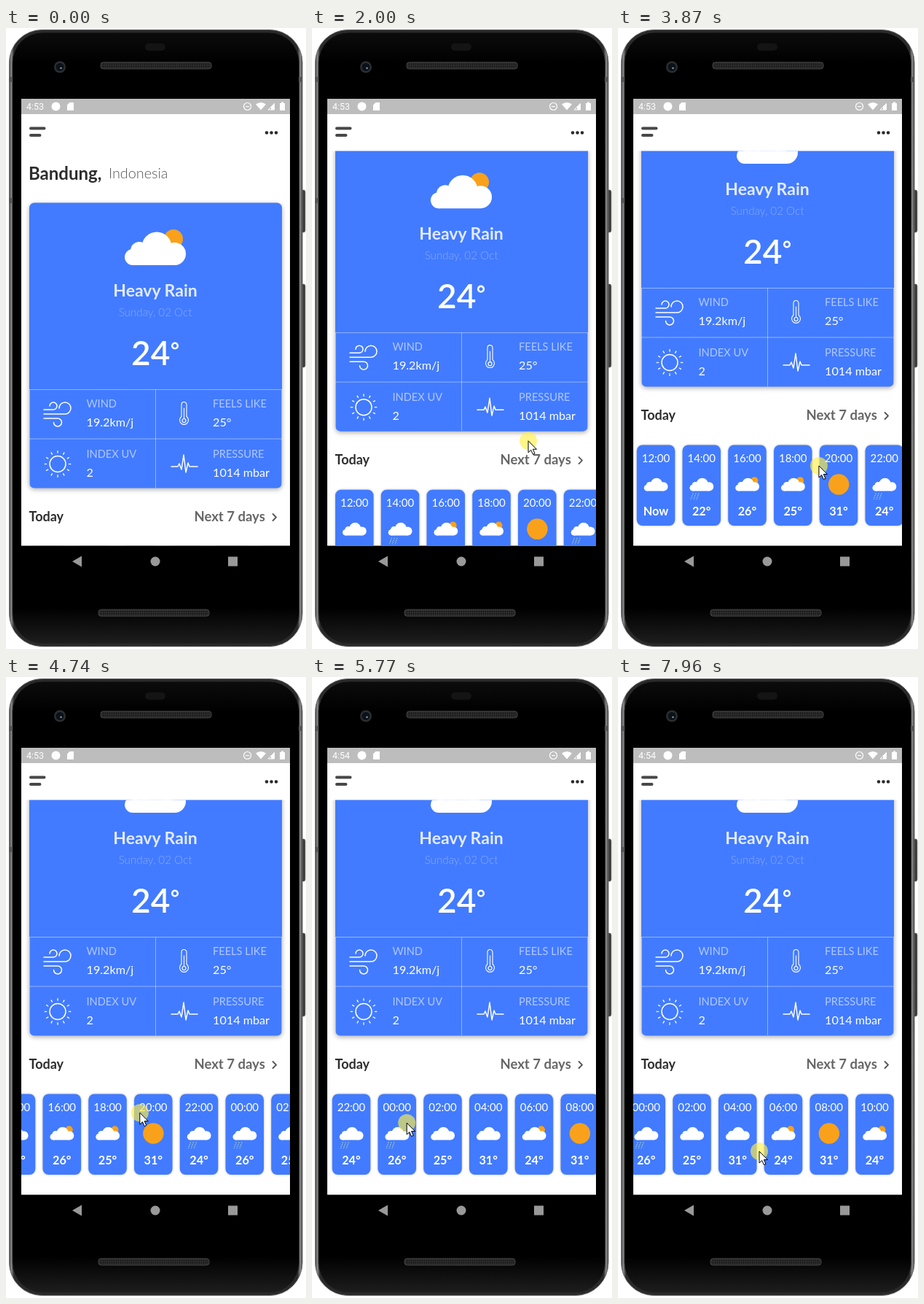
Animation of 412 by 851 pixels, one loop 7.99 s. Source, as an HTML page:

```html
<!DOCTYPE html>
<html lang="en">
<head>
<meta charset="utf-8">
<title>Weather app</title>
<style>
  html, body { margin: 0; width: 100%; height: 100%; overflow: hidden; background: #fff; }
  svg { display: block; width: 100%; height: 100%; }
  text { font-family: Lato, sans-serif; font-size: 16.2px; fill: #fff; }
  .bold { font-weight: 700; }
  .light { font-weight: 300; }
  .label { font-size: 14.6px; fill: #b0c7ff; }
  .mid { text-anchor: middle; }
  .line { fill: none; stroke: #fff; stroke-width: 1.5; stroke-linecap: round; stroke-linejoin: round; }
  .card { fill: #427bff; filter: drop-shadow(0 2px 3px rgba(0, 0, 0, .32)); }
  .hour { fill: #427bff; filter: drop-shadow(0 0 1.5px rgba(0, 0, 0, .3)); }
  .sun { fill: #f9a11b; }
</style>
</head>
<body>
<svg viewBox="0 0 412 851">
  <defs>
    <linearGradient id="rim">
      <stop offset="0" stop-color="#3a3a3a"/><stop offset=".007" stop-color="#8c8c8c"/>
      <stop offset=".016" stop-color="#2a2a2a"/><stop offset=".984" stop-color="#2a2a2a"/>
      <stop offset=".993" stop-color="#8c8c8c"/><stop offset="1" stop-color="#3a3a3a"/>
    </linearGradient>
    <linearGradient id="glass" x2="0" y2="1">
      <stop offset="0" stop-color="#0c0c0c"/><stop offset=".05"/><stop offset=".94"/>
      <stop offset="1" stop-color="#1e1e1e"/>
    </linearGradient>
    <pattern id="grille" width="3" height="3" patternUnits="userSpaceOnUse">
      <rect width="3" height="3" fill="#2e2e2e"/><circle cx="1.5" cy="1.5" r=".9" fill="#111"/>
    </pattern>
    <clipPath id="page"><path d="M21 168.5H390V709.5H21z"/></clipPath>
    <g id="cloud" fill="#fff">
      <circle cx="11" cy="35" r="11"/><circle cx="20" cy="26" r="12"/>
      <circle cx="44" cy="21" r="20.5"/><circle cx="68.5" cy="30.5" r="15.5"/>
      <path d="M11 26H68V46H11z"/>
    </g>
    <g id="sunCloud"><circle class="sun" cx="67" cy="10" r="13"/><use href="#cloud"/></g>
    <g id="rainCloud">
      <use href="#cloud"/>
      <path d="M12 54l-8 22M22 54l-8 22M32 54l-8 22" fill="none" stroke="#a9cfc4" stroke-width="3" stroke-dasharray="4 3"/>
    </g>
    <circle id="sun" class="sun" cx="42" cy="23" r="36.5"/>
  </defs>

  <g id="phone">
    <path d="M404 222h5q2 0 2 3v52q0 3-2 3h-5zM404 351h5q2 0 2 3v108q0 3-2 3h-5z" fill="#3a3a3a" stroke="#777" stroke-width=".6"/>
    <rect x="4.5" y="2.5" width="402.5" height="845" rx="45" fill="url(#rim)" stroke="#666"/>
    <rect x="9" y="6" width="393.5" height="838" rx="41" fill="url(#glass)" stroke="#2b2b2b"/>
    <path d="M4 67h5v7H4zM402 67h5v7h-5zM4 233h5v7H4z" fill="#555"/>
    <rect x="191" y="21" width="28" height="10" rx="5" fill="#141414"/>
    <circle cx="74" cy="53.5" r="8" fill="#2b2e31"/>
    <circle cx="74" cy="53.5" r="5.5" fill="#0c1218"/>
    <circle cx="75.5" cy="55" r="1.3" fill="#8195a5"/>
    <rect x="130" y="47" width="152" height="9" rx="3.5" fill="url(#grille)" stroke="#484848"/>
    <rect x="127" y="797" width="152" height="9" rx="3.5" fill="url(#grille)" stroke="#484848"/>
    <path d="M91 731l13-7.5v15zM305 724.500h13v13h-13z" fill="#999"/>
    <circle cx="205" cy="731" r="6.5" fill="#999"/>
  </g>

  <path d="M21 97H390V709.5H21z" fill="#fff"/>
  <g clip-path="url(#page)"><g id="content"></g></g>
  <path d="M21 97H390V118H21z" fill="#bdbdbd"/>
  <text id="clock" x="28" y="112" style="font: 12.5px Roboto, sans-serif"></text>
  <g fill="#fff">
    <circle cx="68.5" cy="107.5" r="6"/>
    <path d="M87.5 102h5.5v11h-9v-7.5zM343 104.5q7-5 14 0l-7 8zM376 103h2v-1.500h3V103h2v10h-7z"/>
    <path d="M360 112l8.5-8.5v8.5z" fill="none" stroke="#fff"/>
    <path d="M364 112v-4l4.5-4.5v8.5zM329 107h5v1.2h-5z"/>
    <circle cx="331.5" cy="107.5" r="5" fill="none" stroke="#fff" stroke-width="1.2"/>
  </g>
  <path d="M34 137.500H52.500M34 147H46.500" stroke="#484848" stroke-width="4" stroke-linecap="round"/>
  <path d="M358 143.500h14" stroke="#2b2b2b" stroke-width="4.600" stroke-linecap="round" stroke-dasharray="0 6.500"/>

  <g id="cursor">
    <circle r="12" fill="#fff04a" fill-opacity=".65"/>
    <path d="M0 0v16l3.700-3.500 2.700 6 2.600-1.200-2.600-5.800h5z" fill="#fff" stroke="#000"/>
  </g>
</svg>

<script>
const LOOP = 7990;
const $ = id => document.getElementById(id);
const text = (x, y, string, cls = '', style = '') =>
  `<text x="${x}" y="${y}" class="${cls}" style="${style}">${string}</text>`;
const stat = (x, y, label, value) => text(x, y, label, 'label') + text(x, y + 26, value);

const temps = 'Now 22° 26° 25° 31° 24° 26° 25° 31° 24° 31° 24°'.split(' ');
const icons = ('cloud rainCloud sunCloud sunCloud sun rainCloud ' +
  'rainCloud cloud cloud sunCloud sun sunCloud').split(' ');

const hourCard = (temp, i) => `
  <g transform="translate(${32 + i * 62.75} 710.5)">
    <rect class="hour" width="52.5" height="110.5" rx="8"/>
    ${text(26.25, 23, String((12 + 2 * i) % 24).padStart(2, '0') + ':00', 'mid', 'font-size:15px')}
    <use href="#${icons[i]}" transform="translate(10 45) scale(.39)"/>
    ${text(26.25, 96.5, temp, 'mid bold')}
  </g>`;

$('content').innerHTML = `
  ${text(31, 208, 'Bandung,', 'bold', 'font-size:24px;fill:#2d2d2d')}
  ${text(141, 206, 'Indonesia', 'light', 'font-size:19.8px;fill:#555')}
  <rect class="card" x="32" y="239.5" width="347" height="391" rx="7"/>
  <use href="#sunCloud" x="163" y="279"/>
  ${text(205, 367.5, 'Heavy Rain', 'mid bold', 'font-size:23px;fill:#e3ebff')}
  ${text(205, 395, 'Sunday, 02 Oct', 'mid light', 'font-size:15.2px;fill:#86a9ff')}
  ${text(172, 462, '24', '', 'font-size:46px;font-weight:600')}
  <circle class="line" cx="232" cy="435.5" r="3.8" style="stroke-width:2.6"/>
  <path d="M32 495.5H379M32 563H379M205.5 495.5V630M32.5 495.5V626M378.5 495.5V626" stroke="#fff" stroke-opacity=".42" fill="none"/>
  ${stat(110.5, 520, 'WIND', '19.2km/j')}
  ${stat(284, 520, 'FEELS LIKE', '25°')}
  ${stat(110.5, 588.5, 'INDEX UV', '2')}
  ${stat(284, 588.5, 'PRESSURE', '1014 mbar')}
  <g class="line">
    <path d="M52 523h13a5 5 0 1 0-5-5M52 529h29a8 8 0 1 0-8-8M52 535h19a5.500 5.500 0 1 1-5.500 5.500"/>
    <path d="M241 532.500V516a3.500 3.500 0 0 1 7 0v16.500a6 6 0 1 1-7 0zM244.500 521v14" stroke-width="1.100"/>
    <circle cx="244.5" cy="538" r="2.5" stroke-width="1.2"/>
    <circle cx="71" cy="597.5" r="11"/>
    <circle cx="71" cy="597.5" r="16.5" pathLength="120" stroke-width="3.5" stroke-linecap="butt" stroke-dasharray="1.6 8.4" stroke-dashoffset=".8"/>
    <path d="M227 601h9l2-4 3 8 3-20 3 24 3-13 2 5h11"/>
  </g>
  ${text(31.5, 676, 'Today', 'bold', 'font-size:18px;fill:#2d2d2d')}
  ${text(258.5, 676, 'Next 7 days', 'bold', 'font-size:18.5px;fill:#666')}
  <path class="line" d="M366.500 666l4.500 4.500-4.500 4.500" style="stroke:#555;stroke-width:1.8"/>
  <g id="hours">${temps.map(hourCard).join('')}</g>`;

// Progress from 0 to 1 between two times.
const ramp = (time, from, to) => Math.min(1, Math.max(0, (time - from) / (to - from)));
const easeOut = p => 1 - (1 - p) ** 2;
const easeInOut = p => p * p * (3 - 2 * p);

const scrollY = time => 51 * ramp(time, 770, 1550) + 88 * ramp(time, 1570, 2350) ** 2;

const scrollX = time =>
  11 * ramp(time, 3780, 3940) +
  115 * ramp(time, 4090, 4870) +
  192 * easeOut(ramp(time, 4950, 5770)) +
  78 * easeInOut(ramp(time, 5770, 7700));

// Turning points of the pointer: time, x, y.
const turns = [[170, 362, 866], [570, 304, 685], [2000, 297, 566], [2380, 308, 482],
  [2750, 52, 645], [3130, 363, 605], [3870, 276, 600], [5400, 114, 595],
  [5770, 130, 611], [6530, 275, 630], [7350, 9, 642], [7960, 194, 650]];

function pointer(time) {
  const i = Math.max(1, turns.findIndex(turn => turn[0] > time));
  const [[start, x, y], [end, nextX, nextY]] = time < LOOP - 30 ? turns.slice(i - 1, i + 1) : turns.slice(-2);
  const p = ramp(time, start, end);
  return [x + (nextX - x) * p, y + (nextY - y) * p];
}

const move = (id, x, y) => $(id).setAttribute('transform', `translate(${x} ${y})`);
const start = performance.now();

function draw() {
  const time = (performance.now() - start) % LOOP;
  move('content', 0, -scrollY(time));
  move('hours', -scrollX(time), 0);
  move('cursor', ...pointer(time));
  $('cursor').style.display = time < 170 ? 'none' : '';
  $('clock').textContent = time < 5400 ? '4:53' : '4:54';
  requestAnimationFrame(draw);
}
draw();
</script>
</body>
</html>
```
